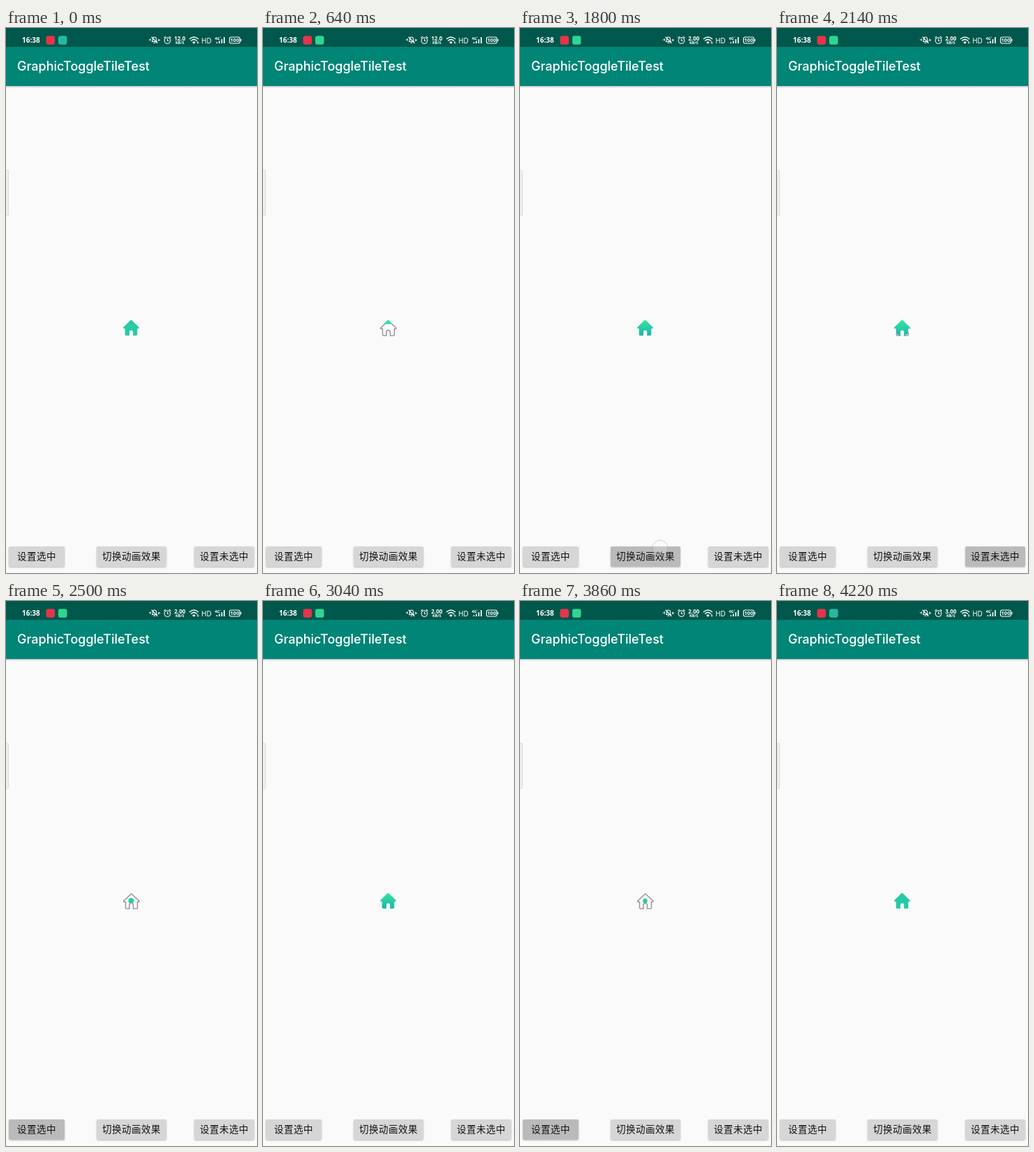
Animation of 360x780 px, one loop 4.24 s. Source, as an HTML page:

```html
<!DOCTYPE html>
<html lang="zh-CN">
<head>
<meta charset="utf-8">
<title>Icon toggle</title>
<style>
  html, body { margin: 0; width: 100%; height: 100%; overflow: hidden; background: #fafafa; }
  svg { display: block; width: 100%; height: 100%; }
  text { font-family: "Noto Sans", "Open Sans", sans-serif; fill: #fff; }
  .title { font: 500 18px Inter, sans-serif; }
  .label { font: 400 13.5px "Noto Sans CJK SC", "Noto Sans CJK", sans-serif; letter-spacing: .5px; fill: #111; text-anchor: middle; }
  .line { fill: none; stroke: #fff; stroke-linecap: round; stroke-linejoin: round; }
</style>
</head>
<body>
<svg viewBox="0 0 360 780">
  <defs>
    <linearGradient id="shade" x1="0" y1="0" x2="0" y2="1">
      <stop id="shadeTop" offset=".1"/><stop id="shadeEnd" offset=".9"/>
    </linearGradient>
    <linearGradient id="barShadow" x1="0" y1="0" x2="0" y2="1">
      <stop stop-opacity=".22"/><stop offset="1" stop-opacity="0"/>
    </linearGradient>
    <filter id="lift" x="-10%" y="-20%" width="120%" height="150%">
      <feDropShadow dx="0" dy="1" stdDeviation="1" flood-opacity=".26"/>
    </filter>
    <clipPath id="inside"><path id="insidePath"/></clipPath>
    <clipPath id="outside"><path id="outsidePath" clip-rule="evenodd"/></clipPath>
  </defs>

  <rect width="360" height="780" fill="#fafafa"/>
  <rect y="83" width="360" height="3" fill="url(#barShadow)"/>
  <rect width="360" height="83" fill="#008577"/>
  <rect width="360" height="27" fill="#00574b"/>
  <text class="title" x="16" y="61">GraphicToggleTileTest</text>

  <!-- status bar -->
  <text x="23" y="21" font-size="10" font-weight="700">16:38</text>
  <rect x="57.5" y="11.3" width="12.5" height="12.5" rx="3" fill="#e5344c"/>
  <rect id="badge" x="75" y="11.3" width="12.5" height="12.5" rx="3"/>
  <g class="line" stroke-width="1.1">
    <path d="M209.500 19.500h7l-1-1.500v-2.500a2.500 2.500 0 0 0-5 0v2.500zM212 21.300h2M209 13l8 8.500M207.500 15.500v2.500M205.700 16.300v1M218.700 16v2.500M220.300 16.800v1"/>
    <circle cx="231.500" cy="18" r="4.300"/>
    <path d="M231.500 15.800v2.400h1.800M226.800 14l2-1.700M236.200 14l-2-1.700"/>
    <path d="M263.500 15.500q6-5 12 0M265.700 18q3.800-3.200 7.600 0" stroke-width="1.500"/>
    <path d="M268 20.500q1.500-1.200 3 0l-1.500 1.500z" fill="#fff"/>
    <path d="M274.500 19v3M276 22v-2" stroke-width=".8"/>
    <rect x="320.500" y="13" width="15" height="9" rx="2.500"/>
    <path d="M337 16.300v2.400"/>
    <path d="M302.500 22v-1.800M306 22v-3.500M309.500 22v-6M313 22v-9" stroke-width="1.700" stroke-linecap="butt"/>
  </g>
  <g font-weight="700" text-anchor="middle">
    <text id="rate" x="249.300" y="17.500" font-size="8"></text>
    <text x="249.300" y="23.300" font-size="5.500">KB/S</text>
    <text x="287.500" y="21.500" font-size="10" font-weight="400">HD</text>
    <text x="304" y="17" font-size="5.500">4G⁺</text>
    <text x="328" y="20.300" font-size="7.500" font-weight="600">100</text>
  </g>

  <rect x="-2" y="203.500" width="5.500" height="65" rx="1" fill="#efefef" stroke="#dcdcdc"/>

  <!-- house icon -->
  <path clip-path="url(#outside)" fill="none" stroke="#929292" stroke-width="1.400" stroke-linejoin="round"
    d="M179.800 418.900L168.700 429.300Q168.300 430.300 169.300 430.500H171.500V439Q171.500 440.400 173 440.400H176.900V435.300A2.800 2.800 0 0 1 182.500 435.300V440.400H187Q188.500 440.400 188.500 439V430.500H190.500Q191.500 430.200 191 429.300Z"/>
  <path clip-path="url(#inside)" fill="url(#shade)"
    d="M178.300 418.500Q179.500 417.500 180.700 418.500L190.600 428.300Q191.500 430.200 189.500 430.300H188.300V438.800Q188.300 440.200 186.800 440.200H182.200V435.200A2.600 2.600 0 0 0 177 435.200V440.200H172.200Q170.700 440.200 170.700 438.800V430.300H169.500Q167.500 430.200 168.400 428.300Z"/>

  <g id="buttons"></g>
  <circle id="touch" cx="201" cy="744" r="11" fill="#fff" fill-opacity=".18" stroke="#999" stroke-opacity=".4"/>
</svg>
<script>
const LOOP = 4240;
const $ = id => document.getElementById(id);
const set = (id, name, value) => $(id).setAttribute(name, value);
const clamp = v => Math.min(1, Math.max(0, v));

const buttons = [
  { x: 4, width: 80, label: '设置选中', taps: [[1100, 1300], [2400, 2570], [3700, 3870]] },
  { x: 130, width: 100, label: '切换动画效果', taps: [[1720, 1880]] },
  { x: 270, width: 86, label: '设置未选中', taps: [[340, 510], [2020, 2180], [3180, 3340]] }
];
$('buttons').innerHTML = buttons.map((b, i) =>
  `<rect id="button${i}" x="${b.x}" y="742" width="${b.width}" height="29" rx="2" filter="url(#lift)"/>
   <text class="label" x="${b.x + b.width / 2}" y="761">${b.label}</text>`).join('');

// Each toggle: start time and whether the icon becomes filled.
const DURATION = 300;
const toggles = [[420, 0], [1120, 1], [2060, 0], [2425, 1], [3245, 0], [3800, 1]];

function fillAmount(t) {
  const current = toggles.filter(([start]) => t >= start).pop();
  if (!current) return 1;
  const p = clamp((t - current[0]) / DURATION);
  return current[1] ? p : 1 - p;
}

// The icon is wiped from the top until the middle button switches to a circle.
function revealPath(t, amount) {
  if (t < 1800) return `M166 417.500h28v${24 * amount}h-28z`;
  const r = 16 * amount;
  return `M${179.5 - r} 429a${r} ${r} 0 0 1 ${2 * r} 0a${r} ${r} 0 0 1 ${-2 * r} 0z`;
}

function pressAmount(t, taps) {
  return Math.max(...taps.map(([down, up]) => clamp(Math.min((t - down) / 60, (up + 60 - t) / 60))));
}

function draw(t) {
  const amount = fillAmount(t);
  const region = revealPath(t, amount);
  set('insidePath', 'd', region);
  set('outsidePath', 'd', amount < 1 ? 'M160 410h40v40h-40z' + region : '');

  const vivid = t >= 560 && t < 4020;
  set('shadeTop', 'stop-color', vivid ? '#30e29e' : '#27c9a6');
  set('shadeEnd', 'stop-color', vivid ? '#20b8ad' : '#27c9a6');
  set('badge', 'fill', vivid ? '#2fd592' : '#27b99b');

  buttons.forEach((b, i) => {
    const grey = Math.round(214 - 28 * pressAmount(t, b.taps));
    set('button' + i, 'fill', `rgb(${grey},${grey},${grey})`);
  });
  set('touch', 'visibility', t >= 1720 && t < 1860 ? 'visible' : 'hidden');
  $('rate').textContent = t < 1100 ? '12.0' : t < 4020 ? '2.00' : '3.00';
}

const began = performance.now();
function tick() {
  draw((performance.now() - began) % LOOP);
  requestAnimationFrame(tick);
}
tick();
</script>
</body>
</html>
```
